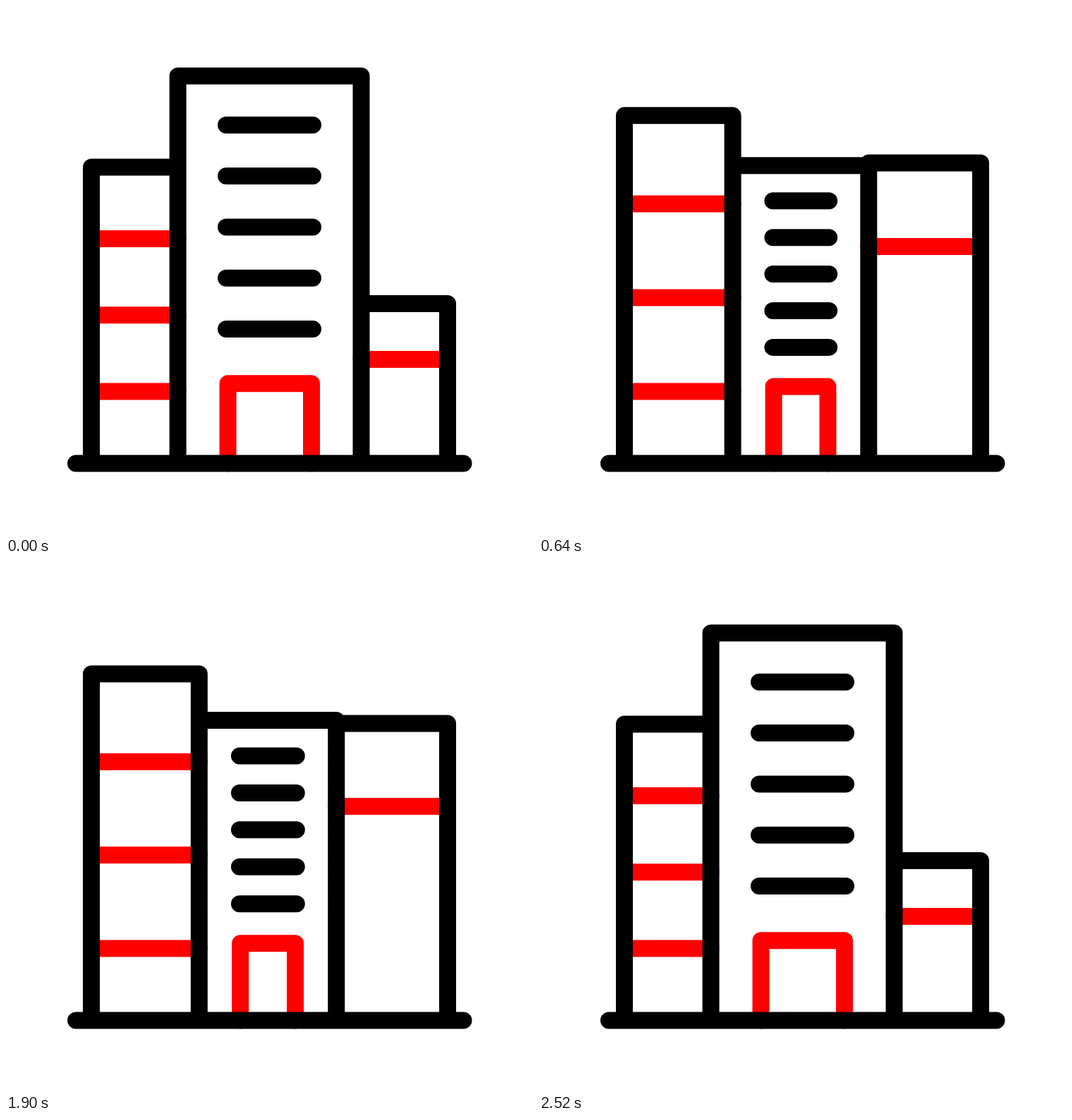
These frames come from a looping animation (747 px wide and 750 px high, 3600 ms). An HTML page:

```html
<!DOCTYPE html>
<html lang="en">
<head>
<meta charset="utf-8">
<title>City buildings</title>
<style>
  html, body { margin: 0; width: 100%; height: 100%; overflow: hidden; background: #fff; }
  svg { display: block; width: 747px; height: 750px; }
  path { fill: none; stroke-width: 24; stroke-linecap: round; stroke-linejoin: round; }
</style>
</head>
<body>
<svg viewBox="0 0 747 750">
  <path id="accents" stroke="#f00"/>
  <path id="outline" stroke="#000"/>
</svg>
<script>
const LOOP = 3600, MOVE = 960, RETURN_END = 2520, STEP = 20;
const GROUND = 648.5, LEFT = 121, RIGHT = 626;
const accents = document.getElementById('accents');
const outline = document.getElementById('outline');

// Solves cubic-bezier(.75, 0, .25, 1) by bisection.
function ease(u) {
  if (u <= 0 || u >= 1) return u <= 0 ? 0 : 1;
  const y = s => s * s * (3 - 2 * s);
  let lo = 0, hi = 1;
  for (let i = 0; i < 30; i++) {
    const s = (lo + hi) / 2;
    if (y(s) + 2.25 * s * (1 - s) * (1 - 2 * s) < u) lo = s; else hi = s;
  }
  return y(lo);
}

const bar = (x1, x2, y) => `M${x1} ${y}H${x2}`;
const frame = (x1, x2, top) => `M${x1} ${GROUND}V${top}H${x2}V${GROUND}`;

function draw(p) {
  const mix = (a, b) => a + (b - a) * p;
  const wallL = mix(243.6, 278.7), wallR = mix(503.5, 462.5);
  const winL = mix(312, 334), winR = mix(435, 408);
  const winTop = mix(168.8, 290.5), winGap = mix(72.3, 49.2);
  const floorGap = mix(108.2, 136.2);

  let black = bar(99, 648.5, GROUND)
    + frame(LEFT, wallL, mix(228.5, 145.7))
    + frame(wallL, wallR, mix(99.2, 243))
    + frame(wallR, RIGHT, mix(422, 196));
  for (let i = 0; i < 5; i++) black += bar(winL, winR, winTop + i * winGap);

  let red = frame(mix(314.5, 335), mix(433, 406.3), mix(535.2, 540))
    + bar(wallR, RIGHT, mix(501, 319.7));
  for (let i = 0; i < 3; i++) red += bar(LEFT, wallL, 546.4 - i * floorGap);

  outline.setAttribute('d', black);
  accents.setAttribute('d', red);
}

const start = performance.now();
function tick() {
  const elapsed = (performance.now() - start) % LOOP;
  const t = Math.floor(elapsed / STEP) * STEP;
  draw(ease(Math.min(t, RETURN_END - t) / MOVE));
  requestAnimationFrame(tick);
}
tick();
</script>
</body>
</html>
```
